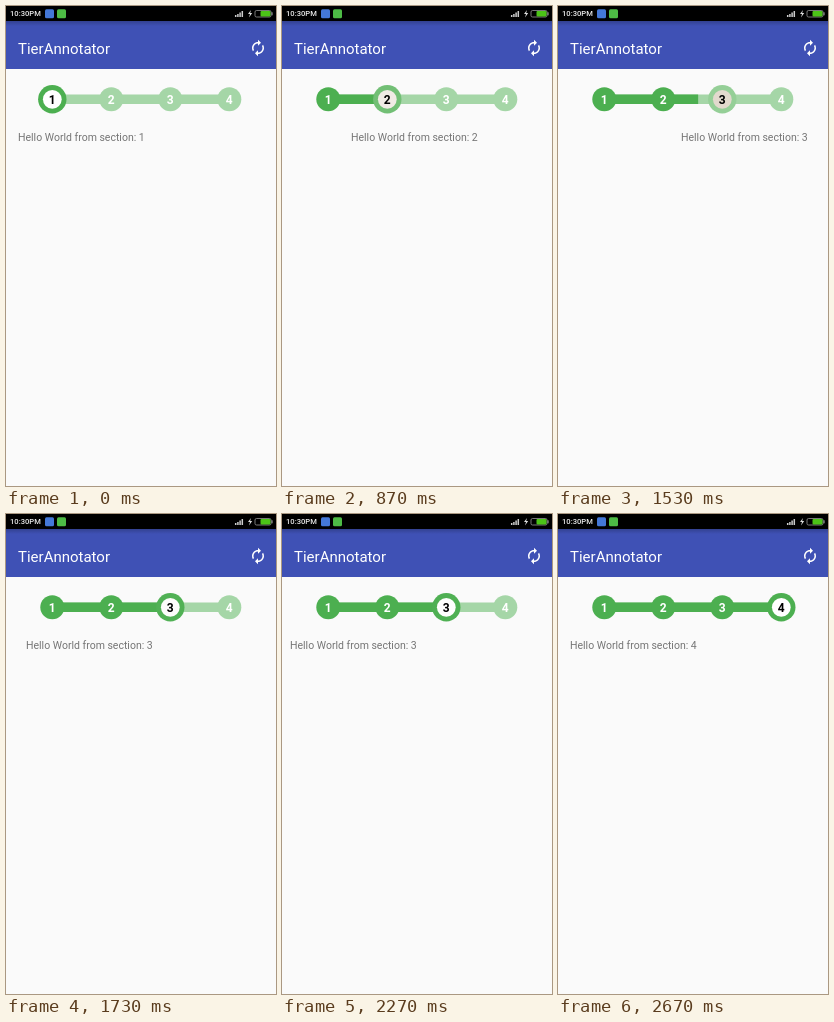
An HTML page for the animation above (2790 ms loop, 270 by 480 pixels).

```html
<!DOCTYPE html>
<html lang="en">
<head>
<meta charset="utf-8">
<title>Step pager</title>
<style>
  html, body { margin: 0; height: 100%; overflow: hidden; background: #fafafa; }
  svg { display: block; width: 100%; height: 100%; font-family: Roboto, sans-serif; }
  #steps text { font: bold 12px Roboto, sans-serif; text-anchor: middle; }
  #pages text { font-size: 10.5px; fill: #757575; }
</style>
</head>
<body>
<svg viewBox="0 0 270 480">
  <linearGradient id="shade" x2="0" y2="1">
    <stop stop-opacity=".2"/>
    <stop offset="1" stop-opacity="0"/>
  </linearGradient>
  <rect width="270" height="480" fill="#fafafa"/>
  <g id="pages"></g>

  <rect y="15" width="270" height="48" fill="#3f51b5"/>
  <rect y="15" width="270" height="5" fill="url(#shade)"/>
  <text x="12" y="48" font-size="15" fill="#fff">TierAnnotator</text>
  <path transform="translate(243 33) scale(.75)" fill="#fff" d="M12 6v3l4-4-4-4v3c-4.42 0-8 3.58-8 8 0 1.57.46 3.03 1.24 4.26L6.7 14.8C6.25 13.97 6 13.01 6 12c0-3.31 2.69-6 6-6zM18.76 7.74L17.3 9.2c.44.84.7 1.79.7 2.8 0 3.31-2.69 6-6 6v-3l-4 4 4 4v-3c4.42 0 8-3.58 8-8 0-1.57-.46-3.03-1.24-4.26z"/>

  <rect width="270" height="15"/>
  <text x="4" y="10.3" font-size="7.6" font-weight="500" fill="#eee">10:30PM</text>
  <rect x="39" y="3.2" width="9" height="9" rx="1.5" fill="#4478d8"/>
  <rect x="51" y="3.2" width="9" height="9" rx="1.5" fill="#4dbb45"/>
  <path d="M229.7 11v-2M231.9 11v-3M234.1 11v-4.5M236.3 11v-6" stroke="#ccc" stroke-width="1.5"/>
  <path d="M245 4l-3 4h2l-1 3.5 3.2-4.5h-2z" fill="#ddd"/>
  <rect x="249" y="4.5" width="16" height="6.5" rx="1.5" fill="none" stroke="#999" stroke-width=".8"/>
  <rect x="254.5" y="5" width="10" height="5.5" rx="1" fill="#4cc417"/>
  <rect x="265.4" y="6.3" width="1.2" height="3" fill="#999"/>

  <g id="steps">
    <path id="track" stroke="#a5d6a7" stroke-width="9.5"/>
    <path id="progress" stroke="#4caf50" stroke-width="9.5"/>
  </g>
</svg>
<script>
const LOOP = 2790, FPS = 15, PAGE = 270, GAP = 59, FIRST = 46.3, MID = 93.3;
const GREEN = [76, 175, 80], LIGHT = [165, 214, 167];
const WHITE = [255, 255, 255], DIM = [220, 208, 194];

// Each swipe: a steady drag up to the release, then a fling that settles.
const swipes = [
  { start: 620, release: 767, end: 1298, dragged: .38 },
  { start: 1210, release: 1491, end: 2021, dragged: .4 },
  { start: 2265, release: 2330, end: 2800, dragged: .2 }
];

function swipeProgress(t, { start, release, end, dragged }) {
  if (t <= start) return 0;
  if (t >= end) return 1;
  if (t < release) return dragged * (t - start) / (release - start);
  return 1 - (1 - dragged) * ((end - t) / (end - release)) ** 5;
}

const mix = (a, b, k) => `rgb(${a.map((v, i) => Math.round(v + (b[i] - v) * k))})`;
const lineTo = step => `M${FIRST} ${MID}h${step * GAP}`;

function add(parent, tag, attrs, text = '') {
  const el = document.createElementNS('http://www.w3.org/2000/svg', tag);
  for (const key in attrs) el.setAttribute(key, attrs[key]);
  el.textContent = text;
  return parent.appendChild(el);
}

const pages = document.getElementById('pages');
const stepGroup = document.getElementById('steps');
const progress = document.getElementById('progress');
document.getElementById('track').setAttribute('d', lineTo(3));

const steps = [0, 1, 2, 3].map(i => {
  add(pages, 'text', { x: 12 + i * PAGE, y: 134.5 }, `Hello World from section: ${i + 1}`);
  const cx = FIRST + i * GAP;
  return {
    disc: add(stepGroup, 'circle', { cx, cy: MID }),
    hole: add(stepGroup, 'circle', { cx, cy: MID, r: 9.4 }),
    label: add(stepGroup, 'text', { x: cx, y: MID + 4.3 }, i + 1)
  };
});

function draw(time) {
  // The picture advances at a fixed rate, on times rounded to 10 ms.
  const tick = Math.floor((time % LOOP + 3.4) * FPS / 1000);
  const t = Math.round(tick * 100 / FPS) * 10;
  const position = swipes.reduce((sum, swipe) => sum + swipeProgress(t, swipe), 0);
  const selected = Math.round(position);
  const fade = Math.min(1, 2 * Math.abs(position - selected));

  pages.setAttribute('transform', `translate(${Math.round(-position * PAGE)} 0)`);
  progress.setAttribute('d', lineTo(position));
  steps.forEach(({ disc, hole, label }, i) => {
    const active = i === selected;
    disc.setAttribute('r', active ? 14.2 : 12);
    disc.setAttribute('fill', mix(GREEN, LIGHT, active ? fade : i > selected ? 1 : 0));
    hole.setAttribute('fill', active ? mix(WHITE, DIM, fade) : 'none');
    label.setAttribute('fill', active ? '#000' : '#fff');
  });
}

const origin = performance.now();
function frame() {
  draw(performance.now() - origin);
  requestAnimationFrame(frame);
}
frame();
</script>
</body>
</html>
```
